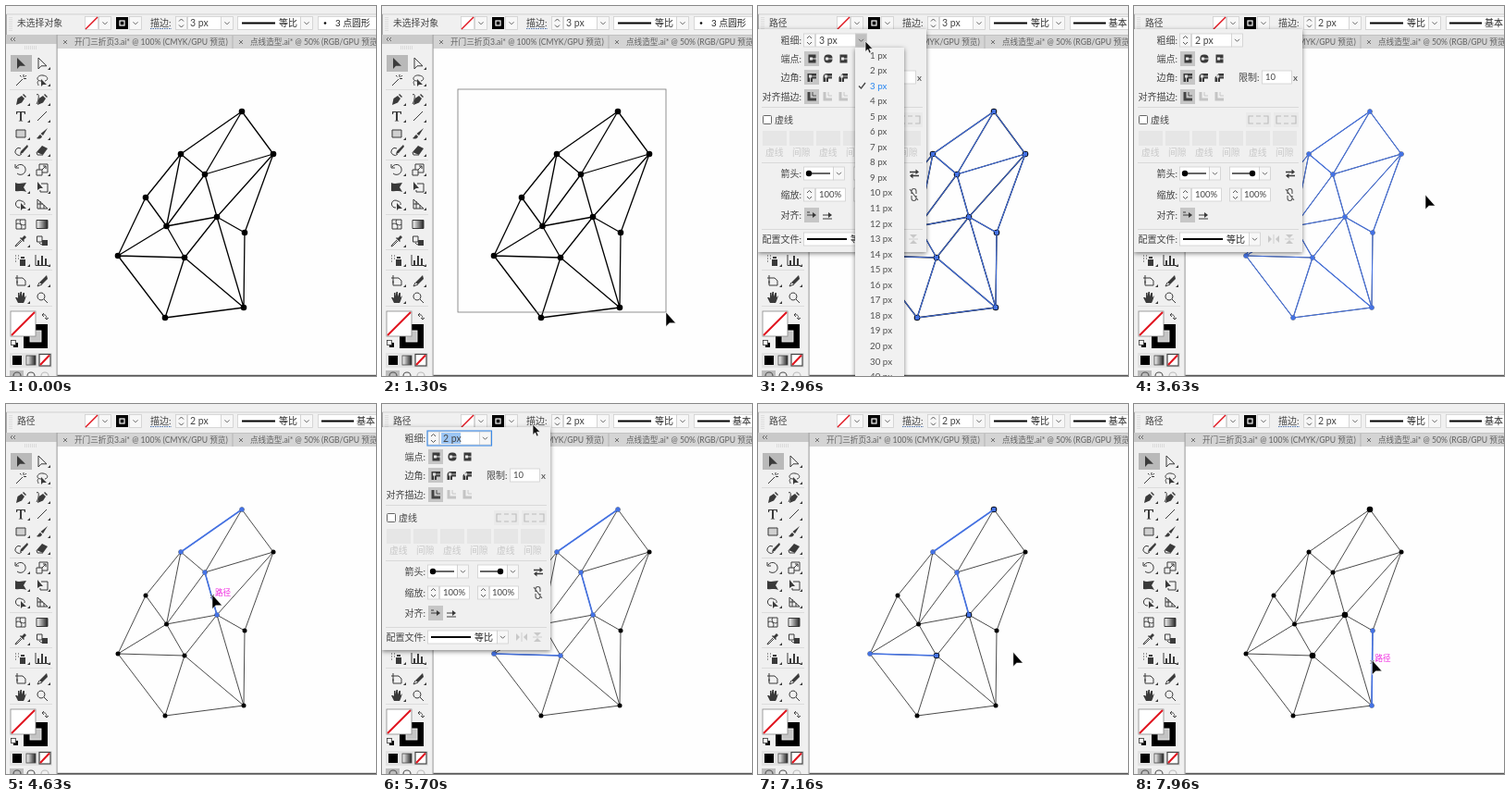
An HTML page for the animation above (8000 ms loop, 400 by 400 pixels).

```html
<!DOCTYPE html>
<html lang="zh-CN">
<head>
<meta charset="utf-8">
<title>描边与箭头</title>
<style>
html, body { margin: 0; width: 100%; height: 100%; overflow: hidden; background: #fefefe; }
svg { display: block; width: 100vw; height: 100vh; }
text { font-family: Lato, "Noto Sans CJK SC", "Noto Sans CJK", sans-serif; white-space: pre; }
</style>
</head>
<body>
<svg id="stage" viewBox="0 0 400 400"></svg>
<script>
const LOOP = 8000, STEP = 200 / 3;
const INK = '#3a3a3a', BLUE = '#4472e4', FACE = '#f0f0f0';

// ---------- drawing helpers ----------
const rect = (x, y, w, h, fill, more = '') =>
  `<rect x="${x}" y="${y}" width="${w}" height="${h}" fill="${fill}" ${more}/>`;
const path = (d, stroke = INK, w = 1, more = '') =>
  `<path d="${d}" fill="none" stroke="${stroke}" stroke-width="${w}" ${more}/>`;
const solid = (d, fill = INK, more = '') => `<path d="${d}" fill="${fill}" ${more}/>`;
const dot = (x, y, r, fill = '#000') => `<circle cx="${x}" cy="${y}" r="${r}" fill="${fill}"/>`;
const group = (id, body, more = '') => `<g id="${id}" ${more}>${body}</g>`;
const at = (x, y, body) => `<g transform="translate(${x} ${y})">${body}</g>`;
// y is the vertical middle of the line of text
const text = (x, y, s, size = 10, fill = '#444', more = '') =>
  `<text x="${x}" y="${y + size * .36}" font-size="${size}" fill="${fill}" ${more}>${s}</text>`;
const label = (x, y, s) => text(x, y, s, 10, '#444', 'text-anchor="end"');
const box = (x, y, w, h, fill = '#fff') =>
  rect(x + .5, y + .5, w - 1, h - 1, fill, 'stroke="#cfcfcf" stroke-width=".8"');
const chevron = (x, y) => path(`M${x - 2.5} ${y - 1.2}l2.5 2.5l2.5 -2.5`, '#555', .9);
const drop = (x, y, w = 13, h = 15, fill = '#f7f7f7') => box(x, y - h / 2, w, h, fill) + chevron(x + w / 2, y);
const stepper = (x, y) => box(x, y - 7.5, 13, 15, '#f7f7f7') +
  path(`M${x + 4} ${y - 2}l2.5 -2.5l2.5 2.5M${x + 4} ${y + 2}l2.5 2.5l2.5 -2.5`, '#444', .9);
const noFill = (x, y, s) => box(x, y, s, s) +
  path(`M${x + 1} ${y + s - 1}L${x + s - 1} ${y + 1}`, '#e0141e', s > 20 ? 2 : 1.5);

// ---------- toolbox ----------
// each tool: filled path | stroked path
const ARROW = 'M-4 -6V6L-1 2.8H5Z';
const PEN = 'M-5 6L-3.5 -1L1 -4L4 -1L1 3.5ZM2 -5l3 3l1 -1l-3 -3Z';
const TOOLS = [
  [62, ARROW + '|', '|' + ARROW],
  [80, '|M-5 6L2 -1M3 -6v3M6 -1.5h-3M-1 -5l1.5 1.5M6 -5l-1.5 1.5',
    'M-1 -1V7L1 5H5Z|M-1 1C-8 1 -5 -6 1 -5C8 -4 6 1 3 1M-4 1C-6 3 -4 4 -4 6'],
  [101, PEN + '|', PEN + '|M-6 -5C-2 -8 -4 2 -6 5'],
  [119, 'M-5 -5H5V-2H4L3.5 -4H1V4.5L2.5 5.5H-2.5L-1 4.5V-4H-3.5L-4 -2H-5Z|', '|M-5 5L5 -5'],
  [138, '|M-5 -4H5V4H-5Z', 'M6 -6L1 2L-1.5 0ZM-2 1L0 3C-1 6 -4 6 -6 5C-4 4 -4 2 -2 1Z|'],
  [156, 'M7 -6L0 1L-1 4L2 3L8 -4Z|M0 -2A4 4 0 1 0 1 4', 'M-6 2L0 -5L6 -2L1 5Z|M-6 2L-5 5L1 5'],
  [177, '|M-5 -3A5.5 5.5 0 1 1 -4 4M-6 -6V-2H-2', '|M-6 0H0V6H-6ZM-3 0V-6H6V3H0M0 0L4 -4M1 -4H4V-1'],
  [196, 'M-6 -5C-2 -3 2 -5 6 -5L3 0L6 5C2 3 -2 5 -6 4Z|', 'M-5 -6V3L-2 1H1Z|M-1 -4H6V5H-2V3'],
  [214, 'M0 -1V7L2 5H6Z|M-1 4A4 4 0 1 1 1 -3A3 3 0 0 1 4 1', '|M-5 -5V5H6L-5 -5M-5 0H1M-2 -3V5M2 1V5'],
  [236, '|M-5 -5H5V5H-5ZM-5 0C-2 -3 2 3 5 0M0 -5C-3 -2 3 2 0 5', '|M-6 -4.5H6V4.5H-6Z'],
  [254, 'M1 -3L4 -6L6 -4L3 -1L4 0L3 1L-1 -3L0 -4Z|M0 -1L-5 4L-6 6L-4 5L1 0', 'M0 -1H6V5H0Z|M-5.5 -5H0V1H-5.5ZM-3 2A4 4 0 0 0 1 4'],
  [275, 'M-1 -1H5V6H-1ZM0 -4H4V-2H0Z|M-6 -5h1M-3 -5h1M-6 -2h1M-3 -2h1M-6 1h1',
    'M-5 0H-3V5H-5ZM-1 -5H1V5H-1ZM3 -2H5V5H3Z|M-7 -6V5.5H7'],
  [297, '|M-4 -6V3M-6 -3H2L5 0V5H-4V0', 'M5 -6L6 -2L0 4L-3 2Z|M-3 2L-5 6L0 4'],
  [315, 'M-3 6L-6 0L-4 0L-3 1V-5H-1.5V-1L-.5 -6H1V-1L2.5 -5H4V0L6 -2L4 4L3 6Z|', '|M2 2L6 6M-1 -5A4 4 0 1 1 -1.1 -5'],
];
const icon = (x, y, spec) => {
  const [fill, line] = spec.split('|');
  return at(x, y, (fill && solid(fill)) + (line && path(line)));
};

function toolbox() {
  let s = rect(0, 31, 55, 369, FACE) + rect(0, 31, 55, 10, '#c9c9c9') + rect(54.5, 31, 1.2, 369, '#a5a5a5') +
    path('M7 34l-2 2l2 2M10 34l-2 2l2 2', '#555', .8) +
    path('M20 44h14M20 46h14', '#bbb', .8, 'stroke-dasharray="1 1"') +
    rect(5, 53, 23, 18, '#b9b9b9');
  for (const y of [91, 167, 226, 264, 286, 325]) s += rect(4, y - 1, 46, .8, '#d8d8d8');
  s += rect(33, 231.5, 12, 9, 'url(#fade)') + rect(11, 134, 10, 8, '#d0d0d0');
  TOOLS.forEach(([y, a, b], row) => {
    s += icon(16, y, a) + icon(39, y, b);
    if (row > 1 && row != 9) s += solid(`M26 ${y + 7}h-3l3 -3Z`);
    if (row != 9 && row != 10 && row != 13) s += solid(`M48 ${y + 7}h-3l3 -3Z`);
  });
  return s + rect(19, 344, 26, 26, '#000') + rect(26, 351, 12, 12, '#c4c4c4', 'stroke="#fff" stroke-width=".8"') +
    rect(5, 330, 27, 27, '#fff', 'stroke="#888" stroke-width=".8"') + path('M6 356L31 331', '#e0141e', 2) +
    path('M39 334C43 333 44 335 44 339M41 332l-2 2l2 2M42 337l2 2l2 -2', INK, .9) +
    rect(8, 364, 5, 5, '#000') + rect(5.5, 361.5, 5, 5, '#fff', 'stroke="#333" stroke-width=".8"') +
    rect(4, 375, 46, 16, '#e2e2e2') + rect(7, 378, 10, 10, '#000') +
    rect(22, 378, 10, 10, 'url(#fade)', 'stroke="#444" stroke-width=".8"') +
    rect(36, 376.5, 12, 12.5, '#fff', 'stroke="#444" stroke-width="1.2"') + path('M37 388L47 377.5', '#e0141e', 2) +
    rect(4, 394, 15, 6, '#bcbcbc') +
    [12, 27, 42].map((x, i) => path(`M${x - 4} 400A4 4 0 0 1 ${x + 4} 400`, i > 1 ? '#bbb' : '#555', 1.2)).join('');
}

// ---------- top bars ----------
function topBar() {
  return rect(0, 0, 400, 32, FACE) + rect(0, 8.5, 400, .9, '#cdcdcd') + rect(0, 9, 1, 22, '#aaa') +
    path('M4 12V27M6 12V27', '#c4c4c4', .8, 'stroke-dasharray="1 1"') +
    group('title', '') +
    noFill(85, 11, 15) + drop(100, 18.5, 14) +
    rect(119, 12, 13, 13, '#000') + rect(123, 16, 5, 5, '#000', 'stroke="#fff" stroke-width="1.2"') + drop(133, 18.5, 14) +
    text(156, 18.5, '描边:') + path('M156 24.5H179', '#4a6fa8', 1, 'id="link" stroke-dasharray="1.5 1"') +
    stepper(183, 18.5) + box(196, 11, 37, 15) + group('weight', '') + drop(232, 18.5, 14) +
    box(250, 11, 69, 15) + rect(255, 17.5, 36, 2, '#000') + text(295, 18.5, '等比', 10, '#222') + drop(318, 18.5, 14) +
    box(337, 11, 70, 15) + group('brush', '');
}
const cross = x => path(`M${x} 37l4 4m0 -4l-4 4`, '#666', .9);
function tabs() {
  return rect(55, 31, 345, 15, '#d4d4d4') + rect(55, 31, 345, 1, '#c2c2c2') + rect(244.5, 32, 1, 14, '#b4b4b4') +
    cross(62) + text(74, 39, '开门三折页3.ai* @ 100% (CMYK/GPU 预览)', 8.6, '#606060') +
    cross(252) + text(264, 39, '点线造型.ai* @ 50% (RGB/GPU 预览)', 8.6, '#606060');
}

// ---------- stroke panel ----------
const picked = (x, y) => rect(x - 8, y - 8, 16, 16, '#c6c6c6');

// one column of the cap, corner and alignment buttons
function strokeButtons(x, i) {
  const round = [0, 4, 0][i], bevel = [0, 0, 4][i], left = x - 4.5;
  const corner = `M${left} 82V${73 + round + bevel}` +
    (round ? `a4 4 0 0 1 4 -4` : `l${bevel} ${-bevel}`) + `H${x + 5}V78.500H${x + 1}V82Z`;
  const faint = i ? '#c4c4c4' : '#444';
  return rect(x - 3.5, 52.5, i == 1 ? 9 : 8, 9, INK, `rx="${round}"`) +
    path(`M${x - 1} 57H${x + 6}`, '#e8e8e8', 1) + rect(x - 2, 55.5, 3, 3, '#e8e8e8') +
    solid(corner) + path(`M${x - 1.5} 82V76H${x + 5}`, '#ddd', .8) + rect(x - 3, 74.5, 3, 3, '#ddd') +
    path(`M${x - 3} 93V101H${x + 5}`, faint, 3) + path(`M${x + 1} 93V97H${x + 5}`, faint, .9);
}

function panelBody() {
  let s = rect(0, 25, 182, 241, FACE, 'filter="url(#shadow)"');
  for (const y of [109, 169, 241]) s += rect(4, y, 174, .8, '#d4d4d4');
  s += label(47, 37, '粗细:') + stepper(49, 37) + box(62, 29.5, 44, 15) + drop(105, 37);
  s += label(47, 57, '端点:') + picked(58, 57) + label(47, 77, '边角:') + picked(58, 77) +
    label(47, 98, '对齐描边:') + picked(58, 98) + [58, 75, 92].map(strokeButtons).join('');
  s += text(113, 77, '限制:') + box(138, 69.5, 33, 15) + text(142, 77, '10', 9.5) + text(172, 77, 'x', 10);
  s += rect(5.5, 118.5, 9, 9, '#fff', 'stroke="#555" stroke-width=".9" rx="1"') + text(18, 123, '虚线');
  for (const x of [123, 153]) s += rect(x - 2, 115, 27, 16, '#eaeaea') +
    path(`M${x + 6} 119H${x + 1}V127H${x + 6}M${x + 17} 119H${x + 22}V127H${x + 17}M${x + 9} 119h5M${x + 9} 127h5`, '#bbb', 1.1);
  for (let i = 0; i < 6; i++)
    s += rect(5 + 29 * i, 135, 26, 16, '#e6e6e6') + text(8 + 29 * i, 158, i % 2 ? '间隙' : '虚线', 9.8, '#c8c8c8');
  s += label(47, 181, '箭头:') + box(49, 173.5, 33, 15) + path('M54 181H78', '#000', 1.2) + dot(55, 181, 3.2) + drop(81, 181) +
    box(103, 173.5, 33, 15) + path('M106 181H130', '#000', 1.2) + dot(128, 181, 3.2) + drop(135, 181) +
    path('M164 179.500H172M165 183.500H174', INK, 1.3) + solid('M170.500 176.500L174 179.500L170.500 182ZM167.500 181L164 183.500L167.500 186.500Z');
  s += label(47, 204, '缩放:') + stepper(49, 204) + box(62, 196.5, 33, 15) +
    stepper(103, 204) + box(116, 196.5, 32, 15) + text(119, 204, '100%', 9.5) +
    path('M166 203V200a2.500 2.500 0 0 1 5 0V203M166 205V208a2.500 2.500 0 0 0 5 0V205M164 198L173 210', '#555', 1.1);
  s += label(47, 226, '对齐:') + picked(58, 226);
  [58, 75].forEach((x, i) => {
    s += path(`M${x - 5} 226H${x + 3}M${x - 5} ${i ? 230 : 223}H${x + 5 - 7 * !i}`, INK, 1.2) +
      solid(`M${x + 1} 223L${x + 5} 226L${x + 1} 229Z`);
  });
  s += label(47, 252, '配置文件:') + box(49, 244.5, 76, 15) + rect(53, 251, 43, 2, '#000') +
    text(100, 252, '等比', 10, '#222') + drop(124, 252) +
    solid('M145 248V256L149 252ZM157 248V256L153 252ZM164 247H172L168 251ZM164 257H172L168 253Z', '#c8c8c8') +
    path('M151 247V257M163 252H173', '#c8c8c8', .8);
  return s + group('fields', '');
}
function weightMenu() {
  let s = drop(105, 37, 13, 15, '#c0c0c0') + rect(105, 45, 53, 370, '#f1f1f1', 'filter="url(#shadow)"');
  for (let i = 0; i < 22; i++) {
    const n = i < 20 ? i + 1 : (i - 17) * 10;
    s += text(121, 53 + 16.55 * i, n + ' px', 9.8, n == 3 ? '#2a86f0' : '#505050');
  }
  return s + path('M109 86.5l2.500 2.500l4.500 -6', '#444', 1.3);
}

// ---------- network ----------
const NODES = {
  A: [255, 114], B: [289, 160], C: [189, 160], D: [215, 182], E: [151, 207], F: [228, 228],
  G: [173.5, 238], H: [258, 245], I: [121, 270], J: [193, 272], K: [257, 326], L: [172, 337],
};
const EDGES = 'AB AC AD BD BF BH CD CE CG DF DG EG EI FG FH FJ FK GI GJ HK IJ IL JK JL KL'.split(' ');
const span = e => 'M' + NODES[e[0]] + 'L' + NODES[e[1]];

function network(t, s) {
  const thin = s.weight == 2, lit = new Set();
  let out = path(EDGES.map(span).join(''), thin ? '#2a2a2a' : '#000', thin ? .85 : 1.3);
  for (const k in NODES) {
    const big = !thin || (t >= 7030 && 'AFJ'.includes(k));
    out += dot(...NODES[k], big ? 3.3 : 2.5);
  }
  for (const e of s.marked) {
    out += path(span(e), BLUE, s.marked.length > 4 ? 1.05 : 1.6);
    lit.add(e[0]).add(e[1]);
  }
  for (const k of lit) {
    const [x, y] = NODES[k];
    out += rect(x - 2.2, y - 2.2, 4.4, 4.4, BLUE);
  }
  return out;
}

// ---------- pointer ----------
// start, end, x, y of each move
const MOVES = [
  [500, 500, 82, 90], [630, 1234, 307, 331], [1300, 1634, 340, 364], [1900, 2234, 166, 17],
  [2434, 2834, 116, 38], [2967, 3167, 128, 69], [3300, 3700, 330, 215], [3900, 4167, 300, 150],
  [4167, 4434, 222, 137], [4434, 4567, 223, 206], [4700, 5034, 157, 271], [5234, 5634, 163, 22],
  [5767, 6100, 80, 204], [6100, 6367, 88, 207], [6700, 7300, 303, 277], [7434, 7767, 257.5, 277],
];
const ease = u => u * u * (3 - 2 * u);
function pointer(t) {
  let [, , x, y] = MOVES[0];
  for (const [from, to, nx, ny] of MOVES) {
    if (t <= from) continue;
    const u = ease(Math.min(1, (t - from) / (to - from || 1)));
    x += (nx - x) * u;
    y += (ny - y) * u;
  }
  return [x, y];
}
const within = (t, a, b) => t >= a && t < b;

function state(t) {
  let marked = [];
  if (within(t, 1360, 3890)) marked = EDGES;
  else if (within(t, 4430, 7490)) {
    marked = ['AC'];
    if (t >= 4560) marked.push('DF');
    if (t >= 5100) marked.push('IJ');
  } else if (t >= 7760) marked = ['HK'];
  return {
    marked,
    hover: within(t, 4430, 4490) || within(t, 4560, 4760) || within(t, 5030, 5290) || t >= 7760,
    chosen: within(t, 1360, 3890) || within(t, 4430, 7490) || t >= 7900,
    weight: t < 3230 ? 3 : 2,
    panel: within(t, 2360, 3700) || within(t, 5700, 7160),
    menu: within(t, 2900, 3230),
    weightFocus: within(t, 2360, 2900) || within(t, 5700, 6160),
    scaleFocus: within(t, 6160, 6900),
    scale: t < 6300 ? '100%' : t < 6430 ? '10%' : '150%',
    tip: within(t, 6630, 6830),
  };
}

// ---------- scene ----------
const stage = document.getElementById('stage');
stage.innerHTML = `<defs>
  <linearGradient id="fade"><stop stop-color="#fff"/><stop offset="1" stop-color="#222"/></linearGradient>
  <filter id="shadow" x="-10%" y="-10%" width="120%" height="120%"><feDropShadow dx="0" dy="1.5" stdDeviation="2.5" flood-opacity=".5"/></filter>
  </defs>` + rect(0, 0, 400, 400, '#fefefe') + group('net', '') + group('marquee', '') +
  rect(55, 398.8, 345, 1.2, '#555') + topBar() + tabs() + toolbox() +
  group('panel', panelBody()) + group('menu', weightMenu()) +
  group('tip', rect(73, 221, 102, 16, '#6c6c6c') + text(77.5, 229, '箭头起始处的缩放因子', 9.3, '#fff')) +
  group('pointer', '');
const el = id => document.getElementById(id);
const show = (id, on) => el(id).setAttribute('display', on ? 'inline' : 'none');
const put = (id, body) => { el(id).innerHTML = body; };

function fields(s) {
  const ring = (x, y, w) => rect(x, y, w, 16, 'none', 'stroke="#3d8be8" stroke-width="1.1"');
  let out = '';
  if (s.weightFocus) out += rect(64, 31, 21, 12, '#9cc6f5') + ring(49, 29, 69.5);
  out += text(66, 37, s.weight + ' px', 10.5);
  if (s.scaleFocus) out += ring(49, 196, 46) + rect(s.scale == '10%' ? 71.3 : 77, 198, 1, 12, '#000');
  return out + text(66, 204, s.scale, 9.5);
}

function render(t) {
  const s = state(t), [x, y] = pointer(t);
  put('net', network(t, s));
  put('marquee', within(t, 630, 1360) ? rect(82, 90, x - 82, y - 90, 'none', 'stroke="#777" stroke-width=".8"') : '');
  put('title', text(12, 18.5, s.chosen ? '路径' : '未选择对象', 9.8));
  put('weight', text(199, 18.5, s.weight + ' px', 10.5));
  put('brush', s.chosen
    ? rect(341, 17.5, 35, 2, '#000') + text(379, 18.5, '基本', 10, '#222')
    : dot(345, 18.5, 1.3) + text(356, 18.5, '3 点圆形', 9.8, '#222'));
  put('fields', fields(s));
  show('link', !s.panel);
  show('panel', s.panel);
  show('menu', s.menu);
  show('tip', s.tip);
  show('pointer', t >= 500);
  const overUi = y < 46 || x < 55 || (s.panel && x < 182 && y < 266);
  const arrow = overUi
    ? solid('M0 0V11.500L2.600 9L4.300 13L6.200 12.200L4.500 8.300H8Z', '#111', 'stroke="#fff" stroke-width=".7"')
    : solid('M0 0V15.500L3.800 11.800H10.500Z', '#000', 'stroke="#fff" stroke-width=".5"');
  put('pointer', at(x, y,
    (s.hover ? text(3, -2, '路径', 8.6, '#f02be0') + path('M-2 0l4 4m0 -4l-4 4', '#444', .8) : '') + arrow));
}

let last = -1;
function tick(now) {
  const t = now % LOOP;
  const step = Math.floor((t - 26) / STEP);
  if (step !== last) {
    last = step;
    render(Math.max(0, 100 / 3 + step * STEP));
  }
  requestAnimationFrame(tick);
}
render(0);
requestAnimationFrame(tick);
</script>
</body>
</html>
```
